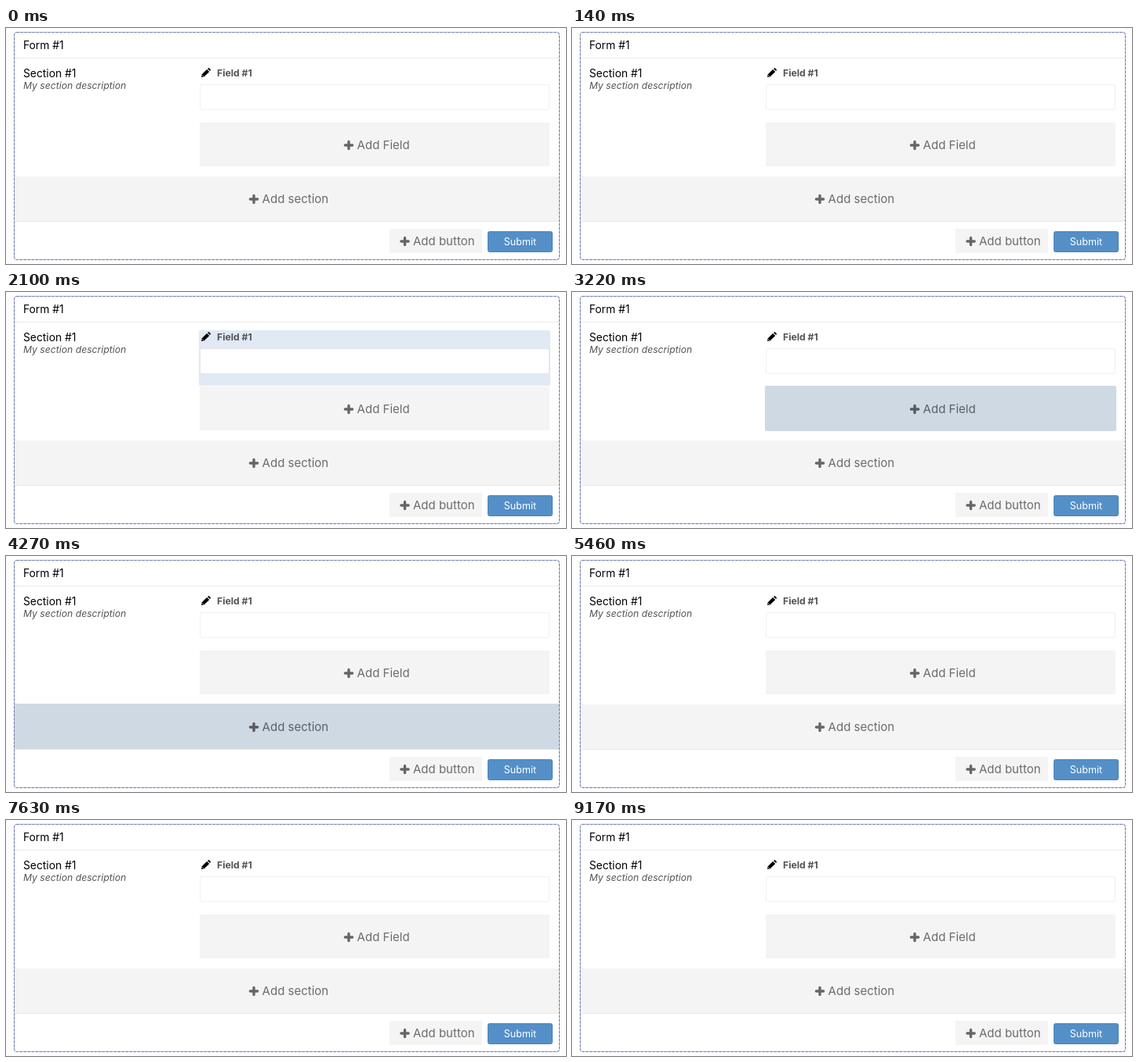
Recreate the animation shown at these times as an HTML page. Size 714 by 302 pixels, loop 9.59 s.

```html
<!DOCTYPE html>
<html lang="en">
<head>
<meta charset="utf-8">
<title>Form builder hover states</title>
<style>
  html, body { margin: 0; width: 100%; height: 100%; overflow: hidden; background: #fdfdfe; }
  svg { display: block; width: 714px; height: 302px; font-family: Inter, Roboto, sans-serif; }

  .outline { fill: none; stroke: #b3bfd8; }
  .dashes { stroke: #6677a0; stroke-dasharray: 3 2; }
  .rule { fill: #e9e9e9; }
  .input { fill: #fff; stroke: #000; stroke-opacity: .06; }
  .idle { fill: #000; fill-opacity: .042; }
  .hot { fill: #cfd9e3; }
  .tint { fill: #e1e9f5; }
  .hot, .tint { visibility: hidden; }

  .title { font-size: 13.8px; fill: #000; }
  .note { font-size: 12.2px; font-style: italic; fill: #555; }
  .label { font-size: 12.2px; font-weight: 700; fill: #555; }
  .add { font-size: 15px; fill: #000; fill-opacity: .56; }
  .submit { font-size: 12.6px; fill: #fff; }

  [data-hover=section] .section.tint,
  [data-hover=field] .field.tint,
  [data-hover=addField] .addField .hot,
  [data-hover=addSection] .addSection .hot,
  [data-hover=addButton] .addButton .hot { visibility: visible; }

  [data-hover=addField] .addField .idle,
  [data-hover=addSection] .addSection .idle,
  [data-hover=addButton] .addButton .idle { visibility: hidden; }

  [data-hover=section] .addField .idle { x: 246px; y: 120px; width: 448px; height: 58px; }
</style>
</head>
<body>
<svg id="stage" viewBox="0 0 714 302" data-hover="none">
  <defs>
    <path id="plus" d="M-4.6 0H4.6M0 -4.6V4.6" stroke="#000" stroke-opacity=".58"
          stroke-width="3.4" stroke-linecap="round" fill="none"/>
  </defs>

  <rect x="10.5" y="5.5" width="695" height="291" rx="3" fill="#fff"/>
  <rect class="section tint" x="11" y="39" width="695" height="150"/>
  <rect class="field tint" x="246" y="49" width="448" height="71" rx="2"/>
  <rect class="rule" x="11" y="38" width="694" height="1"/>

  <text class="title" x="22" y="27">Form #1</text>
  <text class="title" x="22" y="63">Section #1</text>
  <text class="note" x="22" y="78">My section description</text>

  <g transform="translate(249 51)">
    <path d="M0 12L.8 8.3L7.2 1.9L10.2 4.9L3.8 11.3Z"/>
    <path d="M8 1.2L8.8 .4Q9.5 -.2 10.2 .4L11.7 1.9Q12.3 2.6 11.7 3.3L10.9 4.1Z"/>
    <path d="M1.3 9.4L2.7 10.8" stroke="#fff" stroke-width=".8"/>
  </g>
  <text class="label" x="269" y="62">Field #1</text>
  <rect class="input" x="247.5" y="72.5" width="445" height="32" rx="2"/>

  <g class="addField">
    <rect class="idle" x="247" y="121" width="446" height="56"/>
    <rect class="hot" x="246" y="120" width="448" height="58" rx="2"/>
    <use href="#plus" x="437" y="150"/>
    <text class="add" x="447.6" y="155">Add Field</text>
  </g>

  <g class="addSection">
    <rect class="idle" x="11" y="190" width="694" height="57"/>
    <rect class="hot" x="11" y="189" width="694" height="59"/>
    <use href="#plus" x="316" y="219"/>
    <text class="add" x="326.6" y="224">Add section</text>
  </g>
  <rect class="rule" x="11" y="247" width="694" height="1"/>

  <g class="addButton">
    <rect class="idle" x="489" y="257" width="118" height="31"/>
    <rect class="hot" x="488" y="256" width="120" height="33" rx="2"/>
    <use href="#plus" x="508.5" y="273"/>
    <text class="add" x="519" y="278">Add button</text>
  </g>

  <rect x="614.5" y="260.5" width="82" height="26" rx="2" fill="#548fc7" stroke="#4b86be"/>
  <text class="submit" x="655.5" y="278" text-anchor="middle">Submit</text>

  <rect class="outline" x="10.5" y="5.5" width="695" height="291" rx="3"/>
  <rect class="outline dashes" x="10.5" y="5.5" width="695" height="291" rx="3"/>
</svg>
<script>
  const LOOP = 9590;
  const steps = [
    [0, 'none'],
    [1190, 'section'],
    [2100, 'field'],
    [3150, 'addField'],
    [4270, 'addSection'],
    [5390, 'none'],
    [6230, 'addButton'],
    [7490, 'none']
  ];
  const stage = document.getElementById('stage');
  const start = performance.now();

  function draw() {
    const time = Math.max(0, performance.now() - start) % LOOP;
    const hover = steps.findLast(([at]) => at <= time)[1];
    if (stage.dataset.hover !== hover) stage.dataset.hover = hover;
    requestAnimationFrame(draw);
  }
  draw();
</script>
</body>
</html>
```
